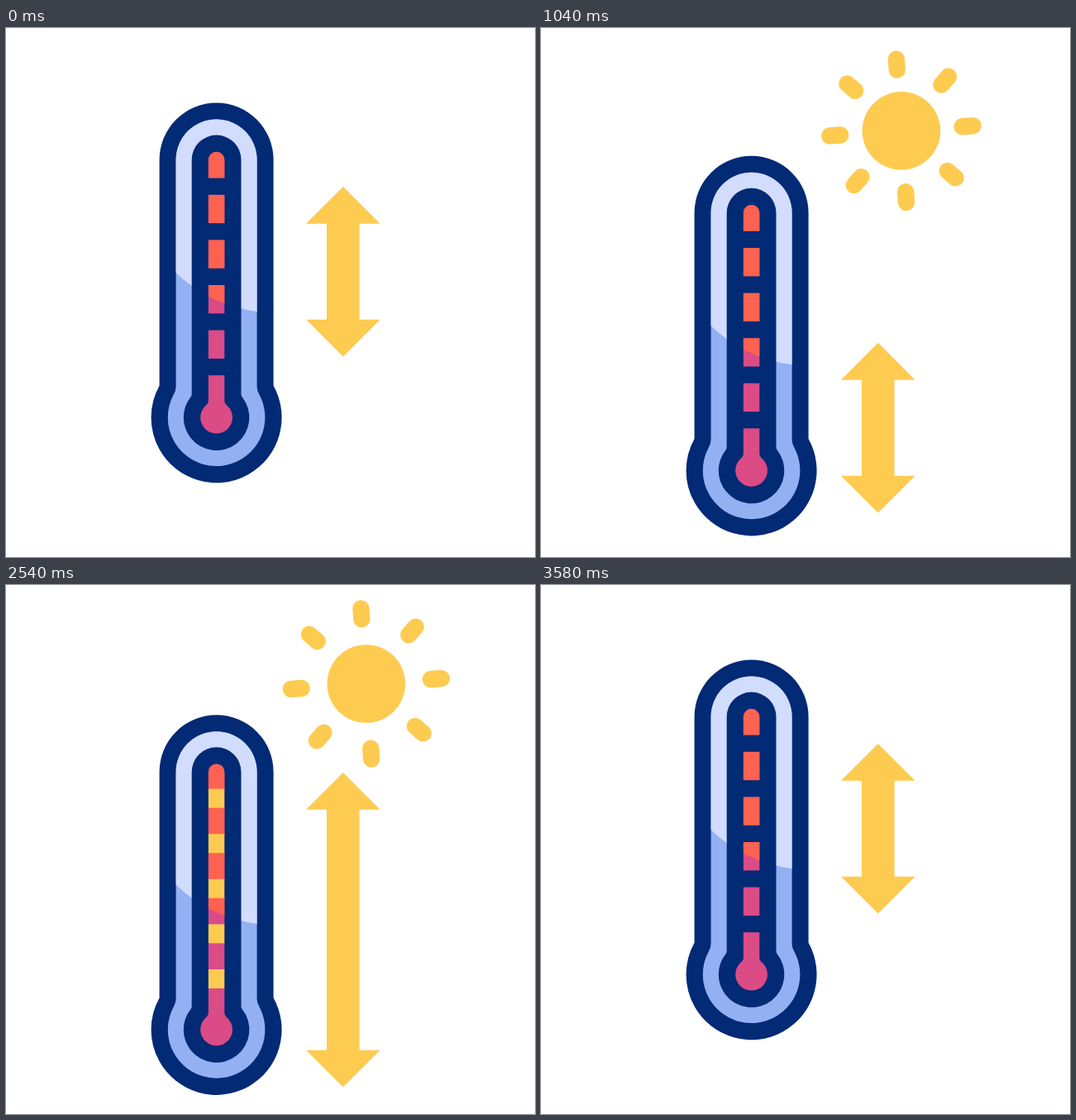
An HTML page with a canvas that plays this animation: 640 px wide and 640 px high, repeating every 3.6 s.

```html
<!DOCTYPE html>
<html lang="en">
<head>
<meta charset="utf-8">
<title>Thermometer</title>
<style>
  html, body { margin: 0; width: 100%; height: 100%; overflow: hidden; background: #fff; }
  canvas { display: block; width: 640px; height: 640px; }
</style>
</head>
<body>
<canvas id="stage" width="640" height="640"></canvas>
<script>
const ctx = document.getElementById('stage').getContext('2d');
const LOOP = 3600;
const NAVY = '#022a75', ICE = '#d2dcfd', BLUE = '#93b0f3';
const RED = '#ff6250', PINK = '#db4b86', YELLOW = '#fecb51';
const TUBE_X = 254.6, TUBE_TOP = 159.5, BULB_Y = 471.2;
const ARROW_X = 407.8, TICK_GAP = 54.6;

const progress = (t, start, end) => Math.min(1, Math.max(0, (t - start) / (end - start)));
const smooth = x => x * x * (3 - 2 * x);
const ease = (t, start, end) => smooth(progress(t, start, end));

// A round-topped tube running into a round bulb, with an optional fillet at the join.
function tubePath(half, radius, fillet) {
  const drop = Math.sqrt(radius * radius - half * half);
  const joinY = BULB_Y - drop;
  const start = Math.atan2(-drop, half) + fillet / radius;
  const end = Math.PI - start;
  const path = new Path2D();
  path.arc(TUBE_X, TUBE_TOP, half, Math.PI, 0);
  path.lineTo(TUBE_X + half, joinY - fillet);
  path.quadraticCurveTo(TUBE_X + half, joinY,
    TUBE_X + radius * Math.cos(start), BULB_Y + radius * Math.sin(start));
  path.arc(TUBE_X, BULB_Y, radius, start, end);
  path.quadraticCurveTo(TUBE_X - half, joinY, TUBE_X - half, joinY - fillet);
  path.closePath();
  return path;
}

const CASE = tubePath(69, 79, 0);
const GLASS = tubePath(49, 58.8, 5);
const CORE = tubePath(29.9, 39.8, 2);
const FLUID = tubePath(9.7, 19.4, 4);

function fillPath(path, color) {
  ctx.fillStyle = color;
  ctx.fill(path);
}

// Two tones split along one large arc.
function fillSplit(path, upper, lower) {
  fillPath(path, lower);
  ctx.save();
  ctx.clip(path);
  ctx.beginPath();
  ctx.arc(326, 170.6, 174, 0, Math.PI * 2);
  ctx.fillStyle = upper;
  ctx.fill();
  ctx.restore();
}

function drawThermometer(t) {
  const y = -66.7 * ease(t, 180, 490) + 133.4 * ease(t, 490, 1090) - 66.7 * ease(t, 2870, 3565);
  ctx.save();
  ctx.translate(0, y);
  fillPath(CASE, NAVY);
  fillSplit(GLASS, ICE, BLUE);
  fillPath(CORE, NAVY);
  fillSplit(FLUID, RED, PINK);
  for (let i = 0; i < 5; i++) {
    const top = 400 - i * TICK_GAP;
    ctx.fillStyle = NAVY;
    ctx.fillRect(TUBE_X - 11, top, 22, 20.2);
    const shown = ease(t, 1240 + i * 240, 1480 + i * 240);
    const hidden = ease(t, 3210 + (4 - i) * 50, 3340 + (4 - i) * 50);
    const width = 19.4 * shown * (1 - hidden);
    ctx.fillStyle = YELLOW;
    ctx.fillRect(TUBE_X - width / 2, top - 1.7, width, 23);
  }
  ctx.restore();
}

function drawArrow(t) {
  const back = ease(t, 2978, 3572);
  const shift = -41.5 * ease(t, 220, 530) + 251.5 * ease(t, 530, 1152) - 210 * back;
  const stretch = 175 * (ease(t, 1160, 2460) - back);
  const top = 192 + shift - stretch, bottom = 397.6 + shift;
  const half = 44.8, shaft = 19.8;
  const right = [[0, top], [half, top + half], [shaft, top + half],
    [shaft, bottom - half], [half, bottom - half], [0, bottom]];
  ctx.beginPath();
  for (const [x, y] of right) ctx.lineTo(ARROW_X + x, y);
  for (const [x, y] of right.reverse()) ctx.lineTo(ARROW_X - x, y);
  ctx.closePath();
  ctx.strokeStyle = '#fff';
  ctx.lineWidth = 6;
  ctx.lineCap = 'butt';
  ctx.stroke();
  ctx.fillStyle = YELLOW;
  ctx.fill();
}

function drawSun(t) {
  // r measures the way left along a parabola that ends at the resting place.
  const p = progress(t, 180, 1130);
  const arrive = smooth(p) + 0.36 * p * (1 - p) ** 2;
  const r = 17.4 * (1 - arrive + ease(t, 2986, 3580));
  if (r > 17.3) return;
  const pulse = 4.5 * Math.sin(Math.PI * 4 * progress(t, 1020, 2752)) ** 2;
  ctx.save();
  ctx.translate(435.8 + r * r, 119.5 + 12.68 * r + 0.458 * r * r);
  ctx.fillStyle = ctx.strokeStyle = YELLOW;
  ctx.beginPath();
  ctx.arc(0, 0, 47.3, 0, Math.PI * 2);
  ctx.fill();
  ctx.rotate(-4 * Math.PI / 180);
  ctx.lineWidth = 20.4;
  ctx.lineCap = 'round';
  for (let i = 0; i < 8; i++) {
    ctx.beginPath();
    ctx.moveTo(73.8 + pulse, 0);
    ctx.lineTo(86.8 + pulse, 0);
    ctx.stroke();
    ctx.rotate(Math.PI / 4);
  }
  ctx.restore();
}

function draw(t) {
  ctx.fillStyle = '#fff';
  ctx.fillRect(0, 0, 640, 640);
  drawSun(t);
  drawArrow(t);
  drawThermometer(t);
}

const begin = performance.now();
function frame() {
  draw((performance.now() - begin) % LOOP);
  requestAnimationFrame(frame);
}
frame();
</script>
</body>
</html>
```
